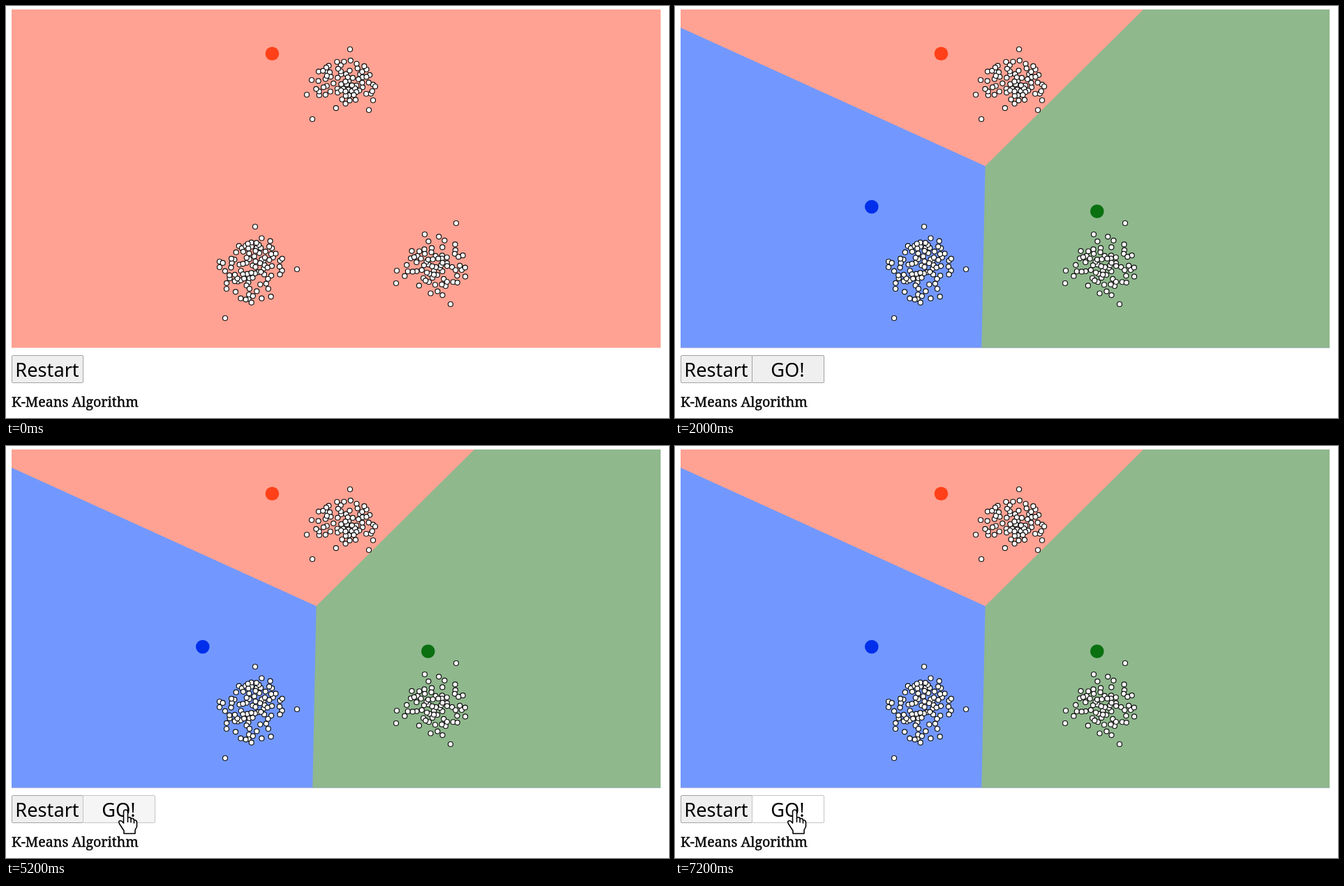
Write an HTML page with a canvas that moves like this. It is 950 by 590 pixels and loops after 8000 ms.

```html
<!DOCTYPE html>
<html lang="en">
<head>
<meta charset="utf-8">
<title>K-Means Algorithm</title>
<style>
  html, body { margin: 0; width: 100%; height: 100%; overflow: hidden; background: #fff; }
  canvas, svg, .button, h1 { position: absolute; margin: 0; }
  canvas, svg { left: 0; top: 0; }
  .button {
    box-sizing: border-box; top: 500px; height: 40px;
    border: 1px solid #a3a3a3; border-radius: 2px; background: #efefef;
    font: 27.2px/40px "Noto Sans", "Open Sans", sans-serif;
    color: #000; text-align: center; text-indent: -1px; white-space: nowrap;
  }
  #restart { left: 8px; width: 103px; }
  #go { left: 110px; width: 104px; }
  h1 {
    left: 8px; top: 555px; white-space: nowrap; color: #000;
    font: 400 19.65px/24px "Noto Serif", serif;
    -webkit-text-stroke: 0.4px #000;
  }
</style>
</head>
<body>
<canvas id="plot" width="950" height="590"></canvas>
<div class="button" id="restart">Restart</div>
<div class="button" id="go">GO!</div>
<h1>K-Means Algorithm</h1>
<svg width="950" height="590">
  <path id="arrow" d="M282 286.5V297l2.4-2.2 1.8 3.7 1.8-.8-1.7-3.6h3.2Z"
    fill="#000" stroke="#dfe6f5" stroke-width=".8"/>
  <g id="hand" stroke="#000" stroke-width="1.6" stroke-linejoin="round">
    <path fill="#fff" d="M168.5 540V524q0-3 3-3t3 3v8q4-1 4.5 1.5q4-.5 4.5 2q3.5 0 4 3V545l-2.5 5v5H169v-4L162.5 541q-2-4 1-4.5q2.5 0 5 3.5Z"/>
    <path fill="none" d="M174.5 532v7M179 533.5v6M183.5 535.5v5"/>
  </g>
</svg>
<script>
const LOOP = 8000;
const AREA = { x: 8, y: 5, w: 930, h: 484.5 };
const COVERED_DOT = '#0442a8';
const sites = [
  { x: 381.4, y: 68.2, from: 0, cell: '#ffa293', dot: '#ff4019' },
  { x: 281.8, y: 287.5, from: 1000, cell: '#7298ff', dot: '#002fec' },
  { x: 604.8, y: 294, from: 2000, cell: '#8fb88d', dot: '#0a7010' }
];

function randomFrom(seed) {
  return () => (seed = (seed * 16807) % 2147483647) / 2147483647;
}

// Normally distributed points, cut off at two deviations and kept slightly apart,
// added to a few stray ones.
function cluster(cx, cy, sx, sy, count, seed, strays) {
  const rand = randomFrom(seed);
  const list = [...strays];
  while (list.length < count) {
    const r = Math.sqrt(-2 * Math.log(rand()));
    const a = rand() * Math.PI * 2;
    const px = cx + sx * r * Math.cos(a), py = cy + sy * r * Math.sin(a);
    const free = list.every(([qx, qy]) => Math.hypot(px - qx, py - qy) > 4);
    if (r < 2 && free) list.push([px, py]);
  }
  return list;
}

const points = [
  ...cluster(484, 111, 23, 19, 78, 4211,
    [[493, 62], [439, 162], [431, 127], [438, 106], [520, 149], [526, 135]]),
  ...cluster(354, 374, 22, 26, 96, 917,
    [[314, 447], [417, 377], [306, 366], [306, 374], [316, 405], [357, 316]]),
  ...cluster(615, 373, 23, 22, 76, 3307,
    [[645, 311], [637, 427], [559, 397], [560, 379], [600, 327], [653, 378]])
];

// Keeps the part of a polygon that lies nearer to a than to b.
function clip(poly, a, b) {
  const nx = b.x - a.x, ny = b.y - a.y;
  const mid = nx * (a.x + b.x) / 2 + ny * (a.y + b.y) / 2;
  const side = p => nx * p[0] + ny * p[1] - mid;
  return poly.flatMap((p, i) => {
    const q = poly[(i + 1) % poly.length];
    const s = side(p), t = side(q);
    const kept = s <= 0 ? [p] : [];
    if (s * t < 0) {
      const k = s / (s - t);
      kept.push([p[0] + (q[0] - p[0]) * k, p[1] + (q[1] - p[1]) * k]);
    }
    return kept;
  });
}

const { x, y, w, h } = AREA;
const box = [[x, y], [x + w, y], [x + w, y + h], [x, y + h]];
// Later cells are painted over earlier ones.
sites.forEach((site, i) => {
  site.poly = sites.slice(0, i).reduce((poly, other) => clip(poly, site, other), box);
});

const ctx = document.getElementById('plot').getContext('2d');
const go = document.getElementById('go');
const arrow = document.getElementById('arrow');
const hand = document.getElementById('hand');
const show = (el, on) => { el.style.display = on ? '' : 'none'; };

function disc(cx, cy, r, color) {
  ctx.beginPath();
  ctx.arc(cx, cy, r, 0, Math.PI * 2);
  ctx.fillStyle = color;
  ctx.fill();
}

function draw(t) {
  const covered = t >= 1000 && t < 2000;
  const active = sites.filter(site => t >= site.from);

  ctx.clearRect(0, 0, 950, 590);
  for (const { poly, cell } of active) {
    ctx.beginPath();
    poly.forEach(p => ctx.lineTo(...p));
    ctx.fillStyle = cell;
    ctx.fill();
  }
  ctx.strokeStyle = '#111';
  ctx.lineWidth = 1.2;
  for (const [px, py] of points) {
    disc(px, py, 3.5, '#fff');
    ctx.stroke();
  }
  active.forEach((site, i) =>
    disc(site.x, site.y, 9.8, covered && i === 1 ? COVERED_DOT : site.dot));

  show(go, t >= 1000);
  show(arrow, covered);
  show(hand, t >= 4000);
  go.style.background = t >= 6000 ? '#fff' : t >= 4000 ? '#f5f5f5' : '#efefef';
  go.style.borderColor = t >= 4000 ? '#c4c4c4' : '#a3a3a3';
}

const start = performance.now();
function tick() {
  draw((performance.now() - start) % LOOP);
  requestAnimationFrame(tick);
}
tick();
</script>
</body>
</html>
```
